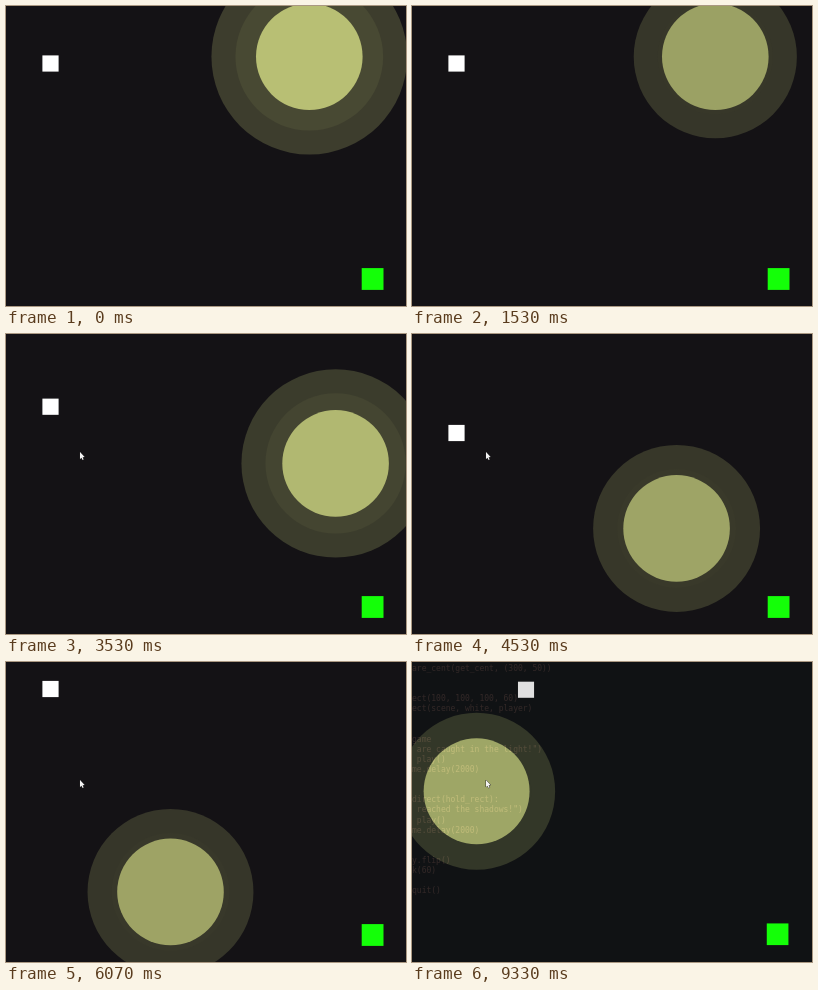
An HTML page with a canvas that plays this animation: 400 px wide and 300 px high, repeating every 9.4 s.

```html
<!DOCTYPE html>
<html lang="en">
<head>
<meta charset="utf-8">
<title>Light game</title>
<style>
  html, body { margin: 0; height: 100%; overflow: hidden; background: #141215; }
  canvas { display: block; width: 100vw; height: 100vh; }
</style>
</head>
<body>
<canvas id="stage" width="400" height="300"></canvas>
<script>
const ctx = document.getElementById('stage').getContext('2d');
const LOOP = 9.4;
const SPEED = 65; // light, pixels per second along each axis
const DARK = [20, 18, 21], DIM = [16, 18, 20], GLOW = [245, 256, 152];
const PULSE_TURNS = [-.7, 1.45, 2.33, 4.95, 5.2, 6, 6.5, 8.4]; // bright, dim, bright ...

const CODE = `are_cent(get_cent, (300, 50))


ect(100, 100, 100, 60)
ect(scene, white, player)


game
 are caught in the light!")
 play()
me.delay(2000)


direct(hold_rect):
 reached the shadows!")
 play()
me.delay(2000)


y.flip()
k(60)

quit()`.split('\n');

// Progress from 0 to 1 between two times.
const span = (t, from, to) => Math.min(1, Math.max(0, (t - from) / (to - from)));
const mix = (a, b, k) => a.map((v, i) => Math.round(v + (b[i] - v) * k));

// The light runs diagonally, bouncing once off the right and once off the bottom.
function lightAt(t) {
  const run = SPEED * (.68 * span(t, 1.65, 2.33) + 4.62 * span(t, 3, 7.62));
  return [355.8 - Math.abs(run - 52.5), 262.2 - Math.abs(run - 211.5)];
}

// 1 at a bright turn, 0 at a dim one, linear in between.
function swellAt(t) {
  const i = PULSE_TURNS.findIndex(turn => turn > t);
  if (i < 0) return 0;
  const k = span(t, PULSE_TURNS[i - 1], PULSE_TURNS[i]);
  return i % 2 ? 1 - k : k;
}

function playerAt(t) {
  return [
    36.4 + 69 * span(t, 6.75, 7.8),
    49.4 + 41.5 * span(t, 3.3, 3.93) - 72 * span(t, 5, 6)
  ];
}

function cursorAt(t) {
  if (t < 1.5) return [108, -5 - 50 * Math.abs(t - .73)];
  const k = span(t, 2.06, 2.27);
  return [49 + 25 * k, -12 + 130 * k];
}

function disc([x, y], radius, light, ground) {
  ctx.fillStyle = `rgb(${mix(ground, GLOW, light)})`;
  ctx.beginPath();
  ctx.arc(x, y, radius, 0, 2 * Math.PI);
  ctx.fill();
}

function square([x, y], size, color) {
  ctx.fillStyle = color;
  ctx.fillRect(x, y, size, size);
}

function drawCursor([x, y]) {
  ctx.beginPath();
  [[0, 0], [0, 7], [1.5, 5.8], [2.6, 8], [3.6, 7.5], [2.6, 5.3], [4.6, 5]]
    .forEach(([dx, dy]) => ctx.lineTo(x + dx, y + dy));
  ctx.closePath();
  ctx.strokeStyle = '#222';
  ctx.lineWidth = .8;
  ctx.stroke();
  ctx.fillStyle = '#f4f4f4';
  ctx.fill();
}

function drawCode(fade) {
  ctx.save();
  ctx.globalCompositeOperation = 'lighter';
  ctx.font = '8px "DejaVu Sans Mono", monospace';
  ctx.fillStyle = `rgba(130, 80, 70, ${.26 * fade})`;
  CODE.forEach((line, i) => ctx.fillText(line, 0, 9 + 10.1 * i));
  ctx.restore();
}

function draw(t) {
  const fade = span(t, 8.47, 9.33);
  const ground = mix(DARK, DIM, fade);
  const zoom = 1 - .006 * fade;
  const light = lightAt(t), swell = swellAt(t);
  const radius = 79 + 28 * swell;
  const glow = .58 + .22 * swell + .04 * fade;
  const white = 255 - 31 * fade;

  ctx.fillStyle = `rgb(${ground})`;
  ctx.fillRect(0, 0, 400, 300);
  ctx.save();
  ctx.translate(200, 150);
  ctx.scale(zoom, zoom);
  ctx.translate(-200, -150);
  disc(light, radius, glow * .25, ground);
  disc(light, radius - 24, glow * (.25 + .1 * swell), ground);
  disc(light, 53.3, glow, ground);
  square(playerAt(t), 16.2, `rgb(${white}, ${white}, ${white})`);
  square([355.7, 262.1], 21.8, '#14ff08');
  ctx.restore();
  drawCode(fade);
  drawCursor(cursorAt(t));
}

function tick() {
  draw(performance.now() / 1000 % LOOP);
  requestAnimationFrame(tick);
}
tick();
</script>
</body>
</html>
```
